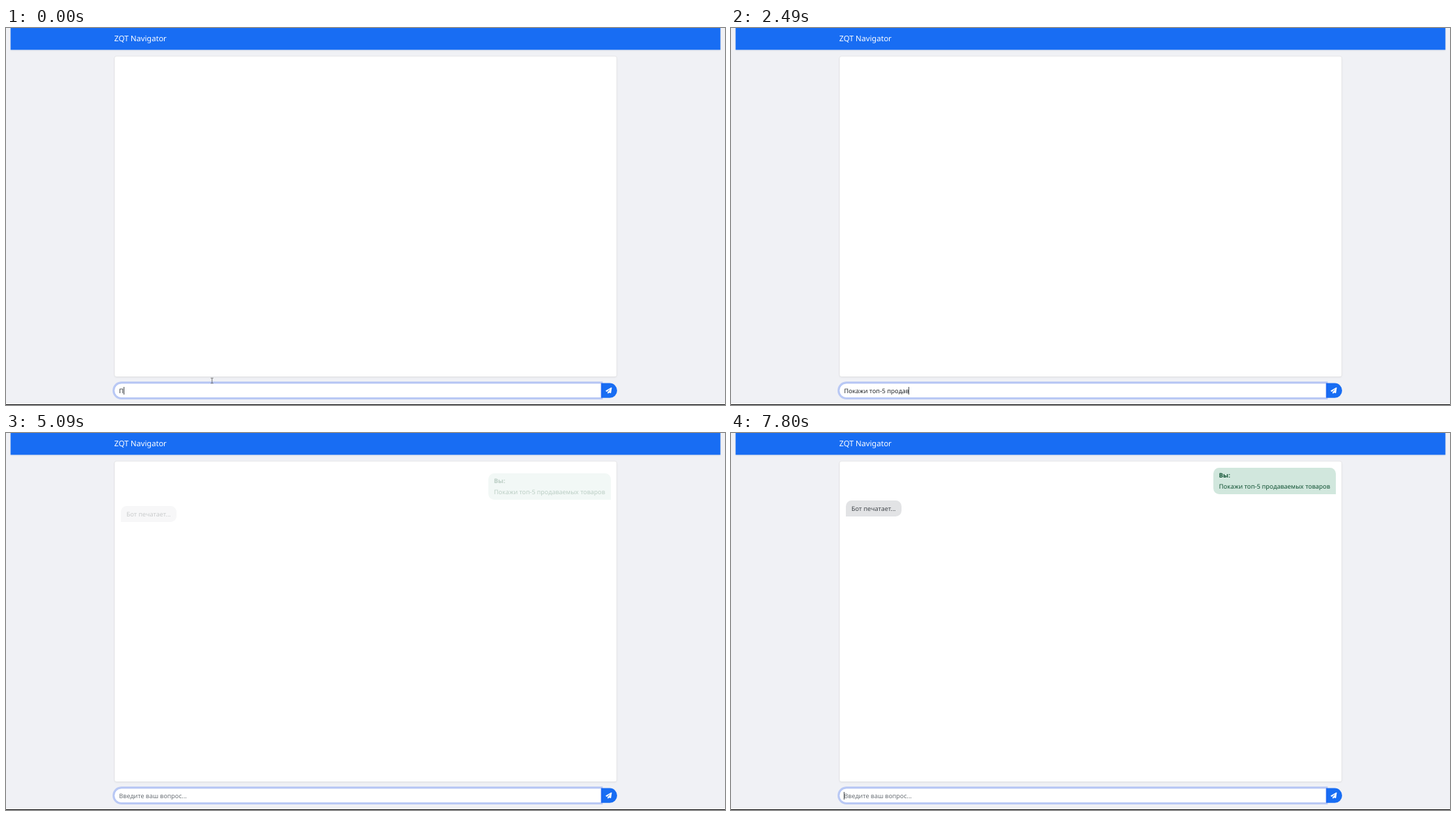
These frames come from a looping animation (1033x542 px, 8000 ms). An HTML page:

```html
<!DOCTYPE html>
<html lang="ru">
<head>
<meta charset="utf-8">
<title>ZQT Navigator</title>
<style>
  html, body { margin: 0; width: 100%; height: 100%; overflow: hidden; background: #f0f1f5; }
  body {
    position: relative;
    font: 8.92px/13.4px "Noto Sans", "Open Sans", sans-serif;
    color: #212529;
    text-rendering: geometricPrecision;
  }
  body > *, .bubble > *, .caret { position: absolute; white-space: pre; }
  svg { left: 0; top: 0; width: 1033px; height: 542px; }
  .blue { fill: #186df3; }
  .soft { filter: drop-shadow(0 1px 1px rgba(0, 0, 0, .06)); }
  .card { fill: #fff; stroke: rgba(0, 0, 0, .12); stroke-width: .56; }
  .ring { fill: none; stroke: rgba(27, 80, 240, .25); stroke-width: 4.46; }
  .field { fill: #fff; stroke: #9db4f5; stroke-width: .56; }
  .beam { fill: none; stroke: #555; stroke-width: .8; }
  h1 { margin: 0; left: 155.4px; top: 0; color: #fff; font-size: 11.14px; font-weight: 400; line-height: 31px; }
  .bubble { border-radius: 8.4px; }
  .bubble > * { left: 8.1px; }
  .user {
    left: 693px; top: 49.6px; width: 175.6px; height: 38.8px;
    background: #d1e7dd; color: #0f5132; border-bottom-right-radius: 0;
  }
  .user b { top: 4.4px; }
  .user span { top: 20px; }
  .bot {
    left: 165px; top: 97px; width: 80.4px; height: 23.2px;
    background: #e2e3e5; color: #41464b; border-bottom-left-radius: 0;
  }
  .bot span { top: 5px; }
  .line, .hint { left: 162.5px; top: 515px; height: 13.4px; }
  .hint { color: #6a7076; }
  .caret { top: .6px; margin-left: -.5px; width: 1px; height: 11.6px; background: #4c5054; }
</style>
</head>
<body>
<svg viewBox="0 0 1033 542">
  <rect class="blue soft" x="6.6" width="1019.8" height="31.4"/>
  <rect class="card soft" x="155.8" y="40.4" width="721.8" height="461.1" rx="3.3"/>
  <path class="blue" d="M854.9 510.6H867.4a10.57 10.57 0 0 1 0 21.15H854.9z"/>
  <path transform="translate(861.5 516.7) scale(.0174)" fill="#fff" d="M498 6q17 11 13 31l-64 416q-8 32-44 24L284 428l-68 74q-28 22-56-22V396q0-6 4-10L332 203q9-13 0-22t-22-1L106 361 18 317q-34-24-2-57L464 4q18-8 34 2z"/>
  <path class="ring" d="M855.1 510.6H165.9a10.57 10.57 0 0 0 0 21.15H855.1z"/>
  <path class="field" d="M854.8 510.9H165.9a10.3 10.3 0 0 0 0 20.6H854.8z"/>
  <path class="beam" d="M294.2 503.3h1.2l.6.5.6-.5h1.2M296 503.8v6.4M294.2 510.7h1.2l.6-.5.6.5h1.2"/>
  <rect y="541" width="1033" height="1" fill="#111"/>
</svg>
<h1>ZQT Navigator</h1>
<div class="bubble user"><b>Вы:</b><span>Покажи топ-5 продаваемых товаров</span></div>
<div class="bubble bot"><span>Бот печатает...</span></div>
<div class="hint">Введите ваш вопрос...</div>
<div class="line"><span id="typed"></span><i class="caret"></i></div>
<script>
  const LOOP = 8000, SENT = 5010, TICK = 80.2;
  const BEAM_END = 1600, BLINK_START = 4165, BLINK = 595, RISE = 490;

  // one sign per tick: "_" waits, "<" deletes
  const keys = 'П__о_кажи_ т_оп_-_5 пр_оад_<<дав_а__е__мы_х _това_ров';

  const $ = s => document.querySelector(s);
  const typed = $('#typed'), caret = $('.caret'), hint = $('.hint'), beam = $('.beam');
  const show = (el, on) => { el.style.visibility = on ? 'visible' : 'hidden'; };

  const rises = [...document.querySelectorAll('.bubble')].map(el => {
    const a = el.animate([
      { opacity: 0, transform: 'translateY(11.14px)' },
      { opacity: 1, transform: 'none' }
    ], { duration: RISE, easing: 'ease-out', fill: 'both' });
    a.pause();
    return a;
  });

  function textAt(t) {
    let text = '';
    for (const key of keys.slice(0, Math.floor(t / TICK) + 1)) {
      if (key === '<') text = text.slice(0, -1);
      else if (key !== '_') text += key;
    }
    return text;
  }

  function draw(now) {
    const t = now % LOOP, sent = t >= SENT;
    const text = sent ? '' : textAt(t);
    if (typed.textContent !== text) typed.textContent = text;
    show(hint, sent);
    show(beam, t < BEAM_END);
    show(caret, t < BLINK_START || Math.floor((t - BLINK_START) / BLINK) % 2 === 0);
    const age = sent ? Math.floor((t - SENT) / 80) * 80 + 10 : 0;
    for (const a of rises) a.currentTime = Math.min(age, RISE);
  }

  const start = performance.now();
  function tick() {
    draw(performance.now() - start);
    requestAnimationFrame(tick);
  }
  tick();
</script>
</body>
</html>
```
